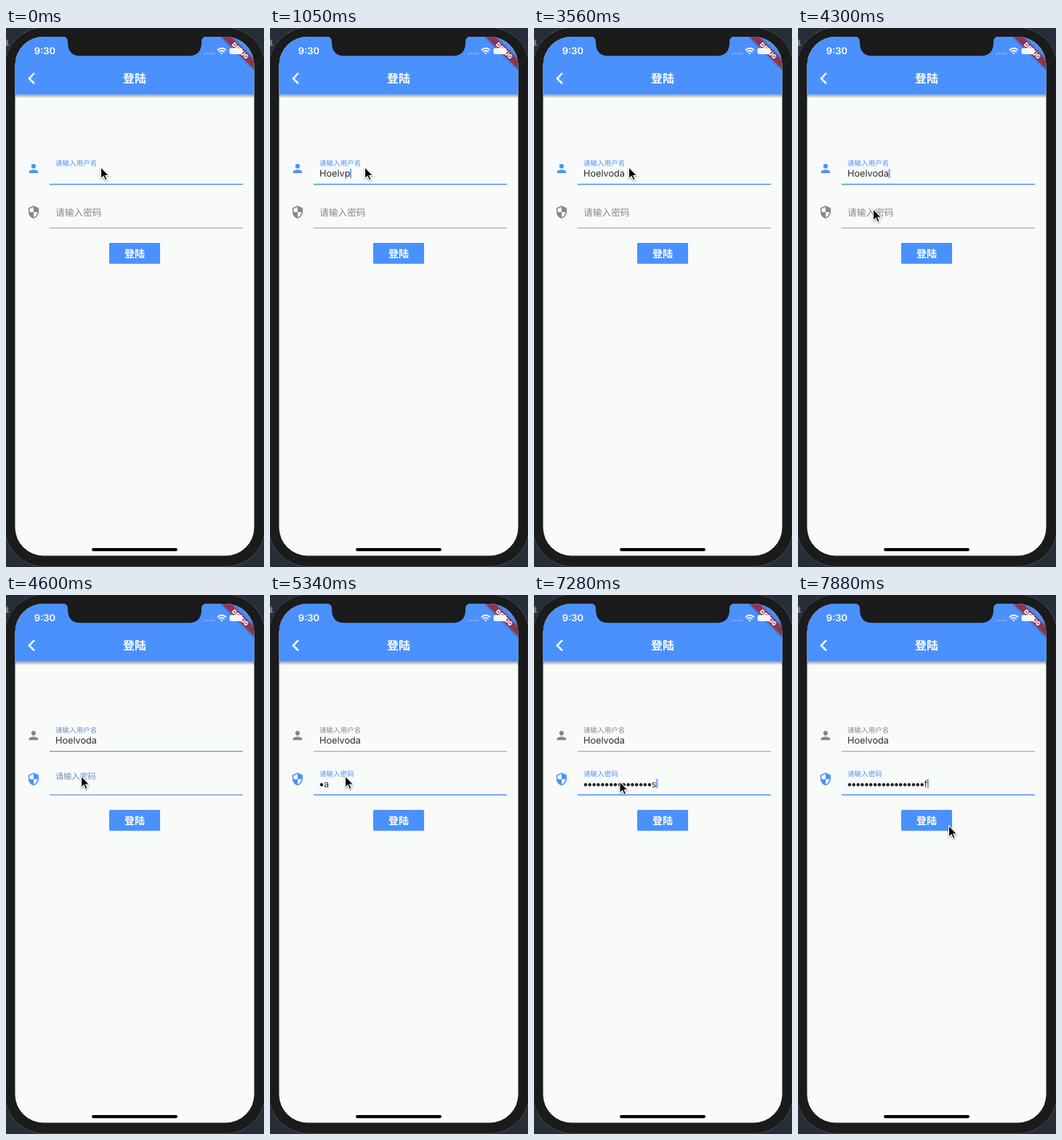
Animation of 355 by 740 pixels, one loop 8 s. Source, as an HTML page:

```html
<!DOCTYPE html>
<html lang="zh">
<head>
<meta charset="utf-8">
<title>登陆</title>
<style>
  html, body { margin: 0; width: 100%; height: 100%; overflow: hidden; background: #272d38; }
  svg { display: block; width: 355px; height: 740px; }
  text { font-family: Inter, "Noto Sans CJK SC", "Noto Sans CJK", sans-serif; text-rendering: geometricPrecision; }
  .mid { text-anchor: middle; }
  .bold { font-weight: 700; fill: #fff; }
  .entry { font-size: 12.7px; fill: #2d2d2d; }
  .dots { font: 16.75px "Liberation Sans", Arial, sans-serif; fill: #222; }
</style>
</head>
<body>
<svg viewBox="0 0 355 740">
  <defs>
    <clipPath id="screen"><rect x="12.5" y="12" width="329" height="712.5" rx="39"/></clipPath>
    <linearGradient id="shade" x2="0" y2="1">
      <stop stop-color="#000" stop-opacity=".34"/>
      <stop offset="1" stop-color="#000" stop-opacity="0"/>
    </linearGradient>
  </defs>

  <rect width="355" height="740" fill="#272d38"/>
  <text x="-6" y="24" font-size="10" fill="#ccc">找</text>
  <rect x="-2" y="-1" width="359" height="740.5" rx="55" fill="#1b1b1c" stroke="#47494d"/>

  <g clip-path="url(#screen)">
    <rect x="12" y="12" width="330" height="713" fill="#f9fbfa"/>
    <rect x="12" y="91.5" width="330" height="5" fill="url(#shade)"/>
    <rect x="12" y="12" width="330" height="79.5" fill="#4b91fd"/>
    <g transform="translate(341.5 12) rotate(45)">
      <rect x="-32" y="22.3" width="64" height="9.5" fill="#b71c1c" fill-opacity=".66" style="filter:drop-shadow(0 0 2px #0007)"/>
      <text class="mid" y="30" font-size="8.1" font-weight="900" fill="#fff">DEBUG</text>
    </g>
  </g>
  <path d="M78 11.5Q85 12 85 19V20Q85 38.3 103 38.3H251Q269 38.3 269 20V19Q269 12 276 11.5Z" fill="#1b1b1c"/>

  <text class="mid" x="53.5" y="36.3" font-size="13" font-weight="600" fill="#fff">9:30</text>
  <g fill="#fff" fill-opacity=".35">
    <circle cx="273.5" cy="35" r="1.2"/><circle cx="277.6" cy="35" r="1.2"/>
    <circle cx="281.7" cy="35" r="1.2"/><circle cx="285.8" cy="35" r="1.2"/>
  </g>
  <g fill="none" stroke="#fff" stroke-width="1.8">
    <path d="M290.8 30.5Q296.8 25 302.8 30.5M293 33Q296.8 29.6 300.6 33"/>
    <path d="M296.8 36.4L295 34.6Q296.8 33.4 298.6 34.6Z" fill="#fff" stroke="none"/>
  </g>
  <rect x="307.5" y="27.5" width="18" height="8.5" rx="2.4" fill="#fff" fill-opacity=".92"/>
  <path d="M326.8 30.2q1.6 1.5 0 3z" fill="#fff" fill-opacity=".6"/>

  <path d="M39 62L32 69.2L39 76.4" fill="none" stroke="#fff" stroke-width="2.5"/>
  <text class="mid bold" x="177" y="75" font-size="15.9">登陆</text>

  <path id="person" transform="translate(28.4 183.4) scale(.795)" d="M12 12c2.21 0 4-1.79 4-4s-1.79-4-4-4-4 1.79-4 4 1.79 4 4 4zm0 2c-2.67 0-8 1.34-8 4v2h16v-2c0-2.66-5.33-4-8-4z"/>
  <path id="shield" transform="translate(28.4 243.2) scale(.795)" d="M12 1L3 5v6c0 5.55 3.84 10.74 9 12 5.16-1.26 9-6.45 9-12V5l-9-4zm0 10.99h7c-.53 4.12-3.28 7.79-7 8.94V12H5V6.3l7-3.11v8.8z"/>
  <text id="userLabel" x="68" y="189" font-size="9.55">请输入用户名</text>
  <text id="passLabel" x="68">请输入密码</text>
  <rect id="userLine" x="60" width="266"/>
  <rect id="passLine" x="60" width="266"/>
  <text id="user" class="entry" x="68" y="203.7"></text>
  <text id="dots" class="dots" x="68" y="266"></text>
  <text id="last" class="entry" y="263.5"></text>
  <rect id="caret" width="1.6" height="13" rx=".8" fill="#4b91fd"/>

  <rect x="142" y="295" width="70" height="28.7" rx="1.6" fill="#4b91fd"/>
  <text class="mid bold" x="177" y="314.7" font-size="14">登陆</text>
  <rect x="118" y="714" width="118" height="4.2" rx="2.1" fill="#000"/>

  <path id="mouse" d="M0 0V15.8L3.6 12.5L6 18L8.6 16.9L6.2 11.5H11.2Z" fill="#000" stroke="#fff" stroke-width="1.1" style="filter:drop-shadow(0 1px 1px #0006)"/>
</svg>
<script>
const LOOP = 8000;
const GREY = [134, 134, 134], BLUE = [75, 145, 253];
const $ = id => document.getElementById(id);

// Each track is a list of [start ms, value...]; values hold until the next entry.
const name = [
  [0, ''], [450, 'H'], [600, 'Hoe'], [750, 'Hoel'], [900, 'Hoelv'], [1050, 'Hoelvp'],
  [1200, 'Hoelvpo'], [1350, 'Hoelvpoda'], [1940, 'Hoelvpod'], [2090, 'Hoelvpo'],
  [2240, 'Hoelvp'], [3120, 'Hoelv'], [3270, 'Hoelvo'], [3420, 'Hoelvod'], [3560, 'Hoelvoda']
];
const secret = [
  [0, 0, ''], [5340, 1, 'a'], [5490, 2, 's'], [5640, 3, 'd'], [5940, 4, 'f'], [6090, 6, 's'],
  [6380, 7, '4'], [6530, 8, 'a'], [6830, 10, 's'], [6980, 12, 'd'], [7130, 14, 'f'],
  [7280, 16, 's'], [7430, 18, 'f']
];
const blink = [
  [0, 0], [450, 1], [2390, .7], [2540, .25], [2680, 0], [2820, .5], [2970, 1], [3560, 0],
  [4300, 1], [4600, 0], [4750, 1], [5050, 0], [6830, 1]
];
const pointer = [
  [0, 130.5, 191], [3860, 126, 201], [4010, 114, 227], [4150, 105, 244], [4300, 103.5, 248.5],
  [7280, 118, 256], [7430, 172, 280], [7580, 228, 303], [7730, 224.5, 307], [7880, 207.5, 316.5]
];
const focus = [[0, 0], [4600, .5], [4750, 1]];

const at = (track, t) => track.findLast(step => step[0] <= t).slice(1);
const mix = (a, b, p) => a + (b - a) * p;
const tint = p => `rgb(${GREY.map((g, i) => mix(g, BLUE[i], p))})`;

function set(id, attrs) {
  for (const key in attrs) $(id).setAttribute(key, attrs[key]);
}

function write(id, text) {
  const el = $(id);
  if (el.textContent !== text) el.textContent = text;
  return text ? el.getComputedTextLength() : 0;
}

function underline(id, y, p) {
  const height = mix(.8, 1.6, p);
  set(id, { y: y - height / 2, height, fill: tint(p) });
}

function draw(t) {
  const [p] = at(focus, t);
  const [count, char] = at(secret, t);
  const [x, y] = at(pointer, t);
  const inPass = p > 0;

  set('person', { fill: tint(inPass ? 0 : 1) });
  set('shield', { fill: tint(inPass ? 1 : 0) });
  set('userLabel', { fill: tint(1 - p) });
  set('passLabel', { fill: tint(p), y: mix(257.5, 248.8, p), 'font-size': mix(12.73, 9.55, p) });
  underline('userLine', 214.6, 1 - p);
  underline('passLine', 274.4, p);

  const userEnd = 68 + write('user', at(name, t)[0]);
  const dotsEnd = 68 + write('dots', '•'.repeat(count));
  set('last', { x: dotsEnd });
  const passEnd = dotsEnd + write('last', char);
  set('caret', {
    x: (inPass ? passEnd : userEnd) - .2,
    y: inPass ? 252.6 : 193.2,
    opacity: at(blink, t)[0]
  });
  set('mouse', { transform: `translate(${x} ${y})` });
}

function tick() {
  draw(performance.now() % LOOP);
  requestAnimationFrame(tick);
}
tick();
</script>
</body>
</html>
```
